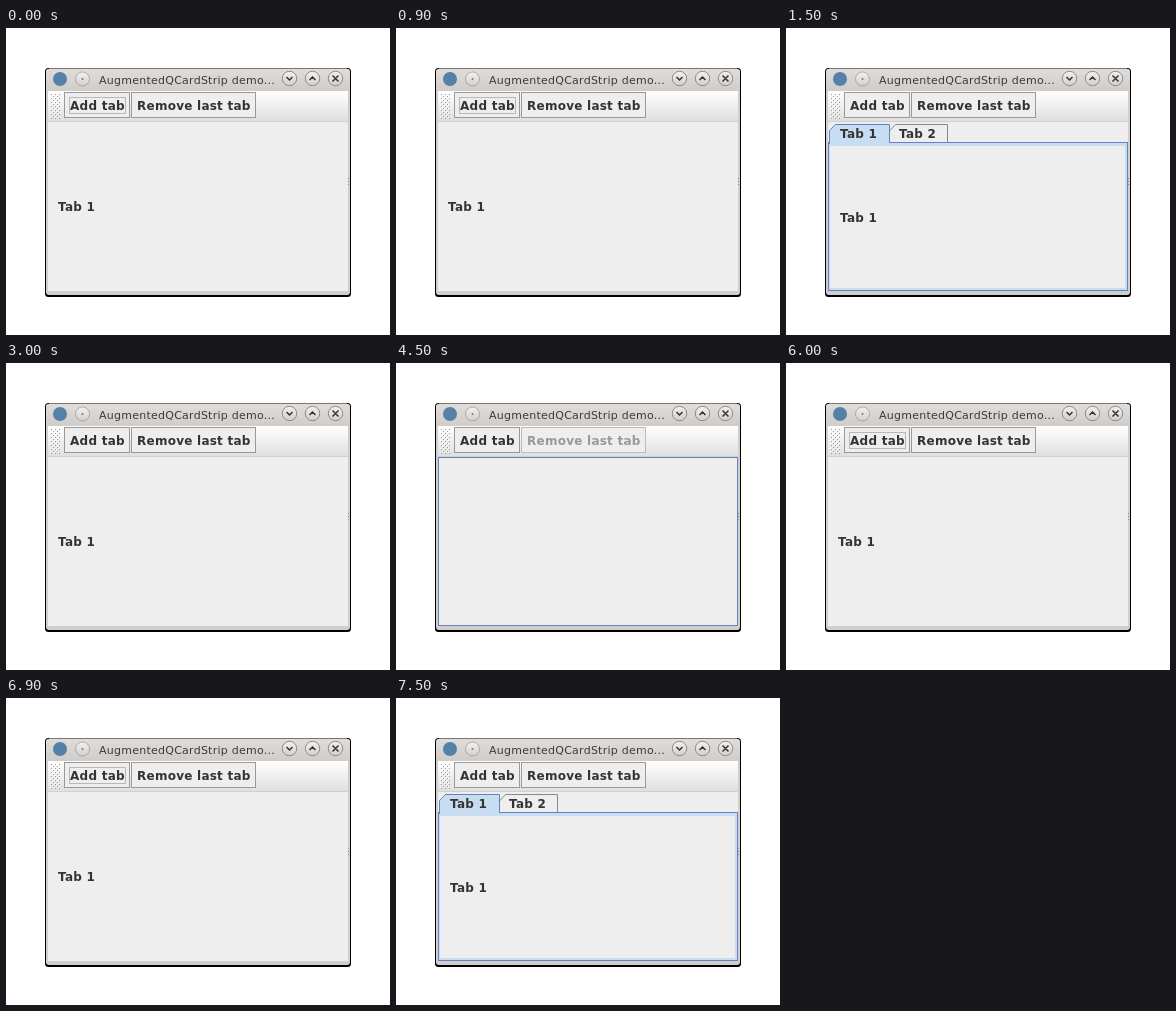
Animation of 384x307 px, one loop 9000 ms. Source, as an HTML page:

```html
<!DOCTYPE html>
<html lang="en">
<head>
<meta charset="utf-8">
<title>Tabbed pane demo</title>
<style>
  html, body { margin: 0; width: 100%; height: 100%; overflow: hidden; background: #fff; }
  svg { display: block; width: 384px; height: 307px; }
  text { font: bold 12px "DejaVu Sans", sans-serif; letter-spacing: .25px; fill: #333; white-space: pre; }
  .title { font-weight: normal; font-size: 11px; fill: #3a3a3a; }
  .off { fill: #999; }
  .crisp { shape-rendering: crispEdges; }
  .line { fill: none; stroke: #6382bf; }
  .button { fill: #eee; stroke: #999; }
  .dim { stroke: #bcbcbc; }
  .knob { fill: url(#knob); stroke: #8d8987; }
  .sign { fill: none; stroke: #333; stroke-width: 1.5; }
</style>
</head>
<body>
<svg viewBox="0 0 384 307">
  <defs>
    <linearGradient id="titlebar" x2="0" y2="1">
      <stop stop-color="#dfdcda"/><stop offset="1" stop-color="#d0ccc9"/>
    </linearGradient>
    <linearGradient id="toolbar" x2="0" y2="1">
      <stop stop-color="#fff"/><stop offset="1" stop-color="#dedede"/>
    </linearGradient>
    <linearGradient id="knob" x2="0" y2="1">
      <stop stop-color="#f3f2f1"/><stop offset="1" stop-color="#d2cecb"/>
    </linearGradient>
    <pattern id="bumps" x="44" y="65" width="4" height="4" patternUnits="userSpaceOnUse">
      <path d="M0 0h1v1h-1zM2 2h1v1h-1z" fill="#fff"/>
      <path d="M1 1h1v1h-1zM3 3h1v1h-1z" fill="#999"/>
    </pattern>
  </defs>

  <!-- Window frame -->
  <rect x="39" y="40" width="306" height="229" rx="3.5"/>
  <rect x="40" y="41" width="304" height="226" rx="3" fill="#d2cecb"/>
  <path d="M40 63V44q0-3 3-3H341q3 0 3 3V63z" fill="url(#titlebar)"/>
  <rect class="crisp" x="43" y="40" width="298" height="1" fill="#777"/>
  <circle cx="54" cy="51" r="7" fill="#5580a8"/>
  <circle cx="76.5" cy="51" r="7" class="knob" stroke-opacity=".6"/>
  <circle cx="76.5" cy="51" r="1" fill="#777"/>
  <text x="93" y="56" class="title">AugmentedQCardStrip demo...</text>
  <g class="knob">
    <circle cx="283.5" cy="50.5" r="7.2"/>
    <circle cx="306.5" cy="50.5" r="7.2"/>
    <circle cx="329.5" cy="50.5" r="7.2"/>
  </g>
  <path class="sign" d="M280.5 49l3 3 3-3M303.5 52l3-3 3 3M326.5 47.5l6 6m0-6l-6 6"/>

  <!-- Toolbar and content -->
  <g class="crisp">
    <rect x="42" y="63" width="300" height="31" fill="url(#toolbar)"/>
    <rect x="42" y="93" width="300" height="1" fill="#d0d0d0"/>
    <rect x="44" y="65" width="10" height="26" fill="url(#bumps)"/>
    <rect x="42" y="94" width="300" height="169" fill="#eee"/>
    <path d="M342.5 150v8" stroke="#8a8785" stroke-dasharray="1 2"/>
    <rect class="button" x="58.5" y="64.5" width="65" height="25"/>
  </g>
  <text x="64" y="82">Add tab</text>

  <g data-stages="focus pair single">
    <rect class="button crisp" x="125.5" y="64.5" width="124" height="25"/>
    <text x="131" y="82">Remove last tab</text>
  </g>
  <g data-stages="empty">
    <rect class="button dim crisp" x="125.5" y="64.5" width="124" height="25"/>
    <text x="131" y="82" class="off">Remove last tab</text>
    <rect class="line crisp" x="42.5" y="94.5" width="299" height="168"/>
  </g>
  <g data-stages="focus">
    <rect class="crisp" x="63.5" y="69.5" width="56" height="16" fill="none" stroke="#b8b8b8"/>
  </g>
  <g data-stages="focus single">
    <text x="52" y="183">Tab 1</text>
  </g>
  <g data-stages="pair">
    <rect class="crisp" x="42" y="114" width="300" height="149" fill="#c8ddf2"/>
    <rect class="crisp" x="44" y="118" width="295" height="142" fill="#eee"/>
    <rect class="line crisp" x="42.5" y="114.5" width="299" height="148"/>
    <path d="M103.5 114V103l6-6.5H161.5V114" fill="#eee" stroke="#7a8a99"/>
    <path d="M43.5 116V102.5l6-6H103.5V115" fill="#c8ddf2" stroke="#6382bf"/>
    <rect x="44" y="114" width="59" height="3" fill="#c8ddf2"/>
    <text x="54" y="110">Tab 1</text>
    <text x="113" y="110">Tab 2</text>
    <text x="54" y="194">Tab 1</text>
  </g>
</svg>
<script>
  const stages = ['focus', 'pair', 'single', 'empty', 'focus', 'pair'];
  const stageTime = 1500;

  for (const group of document.querySelectorAll('[data-stages]')) {
    const shownIn = group.dataset.stages.split(' ');
    const opacity = stage => shownIn.includes(stage) ? 1 : 0;
    const steps = stages.map((stage, i) => ({
      opacity: opacity(stage),
      offset: i / stages.length,
      easing: 'steps(1, end)'
    }));
    steps.push({ opacity: opacity(stages[0]), offset: 1 });
    group.animate(steps, { duration: stageTime * stages.length, iterations: Infinity });
  }
</script>
</body>
</html>
```
